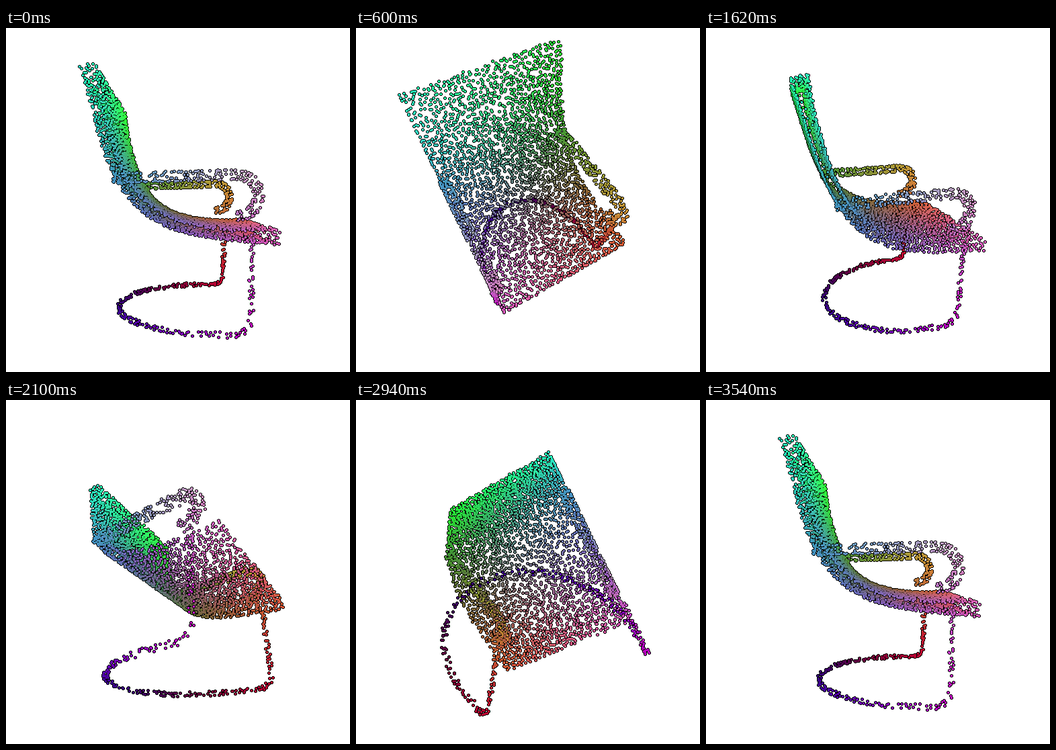
Write a matplotlib script that moves like this. It is 512 px wide and 512 px high and loops after 3.6 s.

```python
import numpy as np
import matplotlib.pyplot as plt
from matplotlib.animation import FuncAnimation

SIZE = 512
FRAMES = 60
FOCAL = 443.0
DISTANCE = 1.43
FAR = 1e3
HALF_WIDTH = .33
FLOOR = -.497

rng = np.random.default_rng(7)


def bezier(a, b, c, d, n=60):
    t = np.linspace(0, 1, n)[:, None]
    a, b, c, d = map(np.array, (a, b, c, d))
    return ((1 - t) ** 3 * a + 3 * t * (1 - t) ** 2 * b
            + 3 * t ** 2 * (1 - t) * c + t ** 3 * d)


def arc(center, rx, ry, start, stop, n=40):
    a = np.radians(np.linspace(start, stop, n))
    return np.stack([center[0] + rx * np.cos(a),
                     center[1] + ry * np.sin(a)], -1)


def along(path, s):
    """Positions and unit directions at arc-length fractions s."""
    length = np.linalg.norm(np.diff(path, axis=0), axis=1)
    knots = np.r_[0, np.cumsum(length)] / length.sum()
    slope = np.gradient(path, axis=0)
    slope /= np.linalg.norm(slope, axis=1)[:, None]
    return [np.stack([np.interp(s, knots, col) for col in data.T], -1)
            for data in (path, slope)]


def spread(points, count, gap):
    """Keep up to count points that are at least gap apart."""
    kept = np.full((count, 3), 9.0)
    n = 0
    for p in points:
        if ((kept[:n] - p) ** 2).sum(1).min(initial=9) > gap * gap:
            kept[n] = p
            n += 1
            if n == count:
                break
    return kept[:n]


def slab(path, thickness, z0, z1, count, gap):
    """Surface of a side profile extruded from z0 to z1, ends closed."""
    m = count * 4
    s = rng.uniform(-.02, 1.02, m)
    capped = (s < 0) | (s > 1)
    s = s.clip(0, 1)
    pos, slope = along(path, s)
    width = z1 - z0
    on_face = rng.random(m) < width / (width + .04)
    side = rng.choice([-.5, .5], m)
    inner = rng.random((2, m)) - .5
    offset = thickness(s) * np.where(on_face & ~capped, side, inner[0])
    z = (z0 + z1) / 2 + width * np.where(on_face | capped, inner[1], side)
    x = pos[:, 0] - slope[:, 1] * offset
    y = pos[:, 1] + slope[:, 0] * offset
    return spread(np.stack([x, y, z], -1), count, gap)


def tube(path, radius, count, gap):
    m = count * 4
    v = rng.normal(size=(m, 3))
    v /= np.linalg.norm(v, axis=1)[:, None]
    return spread(along(path, rng.random(m))[0] + radius * v, count, gap)


def base_path():
    """Front leg, runner, round back, and the mirrored other side."""
    corner = arc((.205, FLOOR + .06), .06, .06, 0, -90)
    leg = np.vstack([[.272, -.13], corner])
    leg = np.column_stack([leg, np.full(len(leg), HALF_WIDTH + .005)])
    sweep = arc((.15, 0), .43, HALF_WIDTH, 90, 270)
    floor = np.insert(sweep, 1, FLOOR, axis=1)
    return np.vstack([leg, floor, leg[::-1] * [1, 1, -1]])


def build_chair():
    shell = bezier((-.338, .505), (-.24, -.025), (-.15, -.135), (.375, -.138))
    arm = np.vstack([[-.24, .083], arc((.22, .018), .08, .078, 90, -90)])

    def shell_thickness(s):
        return .035 + .022 * (2 * s - 1) ** 6

    def arm_thickness(s):
        return np.full_like(s, .034)

    return np.vstack([
        slab(shell, shell_thickness, -HALF_WIDTH, HALF_WIDTH, 2700, .016),
        slab(arm, arm_thickness, .296, .338, 210, .011),
        slab(arm, arm_thickness, -.338, -.296, 210, .011),
        tube(base_path(), .01, 240, .011),
    ])


chair = build_chair()
colors = np.clip(chair * [1, 1, .85] + [.5, .5, .48], 0, 1)
dy, dx = (g.ravel() for g in np.mgrid[-1:2, -1:2])


def view(angle):
    """Right, up and towards-camera axes; azimuth and elevation are equal."""
    c, s = np.cos(angle), np.sin(angle)
    toward = np.array([c * s, s, c * c])
    right = np.cross([0, 1, 0], toward)
    right /= np.linalg.norm(right)
    return right, np.cross(toward, right), toward


def render(i):
    right, up, toward = view(2 * np.pi * i / (FRAMES - 1))
    depth = DISTANCE - chair @ toward
    px = np.rint(SIZE / 2 + FOCAL * (chair @ right) / depth).astype(int)
    py = np.rint(SIZE / 2 - FOCAL * (chair @ up) / depth).astype(int)

    order = np.argsort(-depth)
    cols = np.clip(px[order, None] + dx, 0, SIZE - 1).ravel()
    rows = np.clip(py[order, None] + dy, 0, SIZE - 1).ravel()
    image = np.ones((SIZE, SIZE, 3))
    zbuf = np.full((SIZE, SIZE), FAR)
    image[rows, cols] = np.repeat(colors[order], dx.size, axis=0)
    zbuf[rows, cols] = np.repeat(depth[order], dx.size)

    # Darken pixels that lie well behind a nearer neighbour.
    logz = np.log2(zbuf)
    drop = np.zeros_like(logz)
    for axis in (0, 1):
        for step in (-1, 1):
            drop += np.maximum(0, logz - np.roll(logz, step, axis) - .06)
    return image * np.exp(-6 * drop)[..., None]


fig = plt.figure(figsize=(5.12, 5.12), dpi=100, facecolor="white")
ax = fig.add_axes([0, 0, 1, 1])
ax.axis("off")
picture = ax.imshow(render(0), interpolation="nearest", aspect="auto")


def update(i):
    picture.set_data(render(i))
    return [picture]


anim = FuncAnimation(fig, update, frames=FRAMES, interval=60,
                     repeat=True, repeat_delay=0)
plt.show()
```
